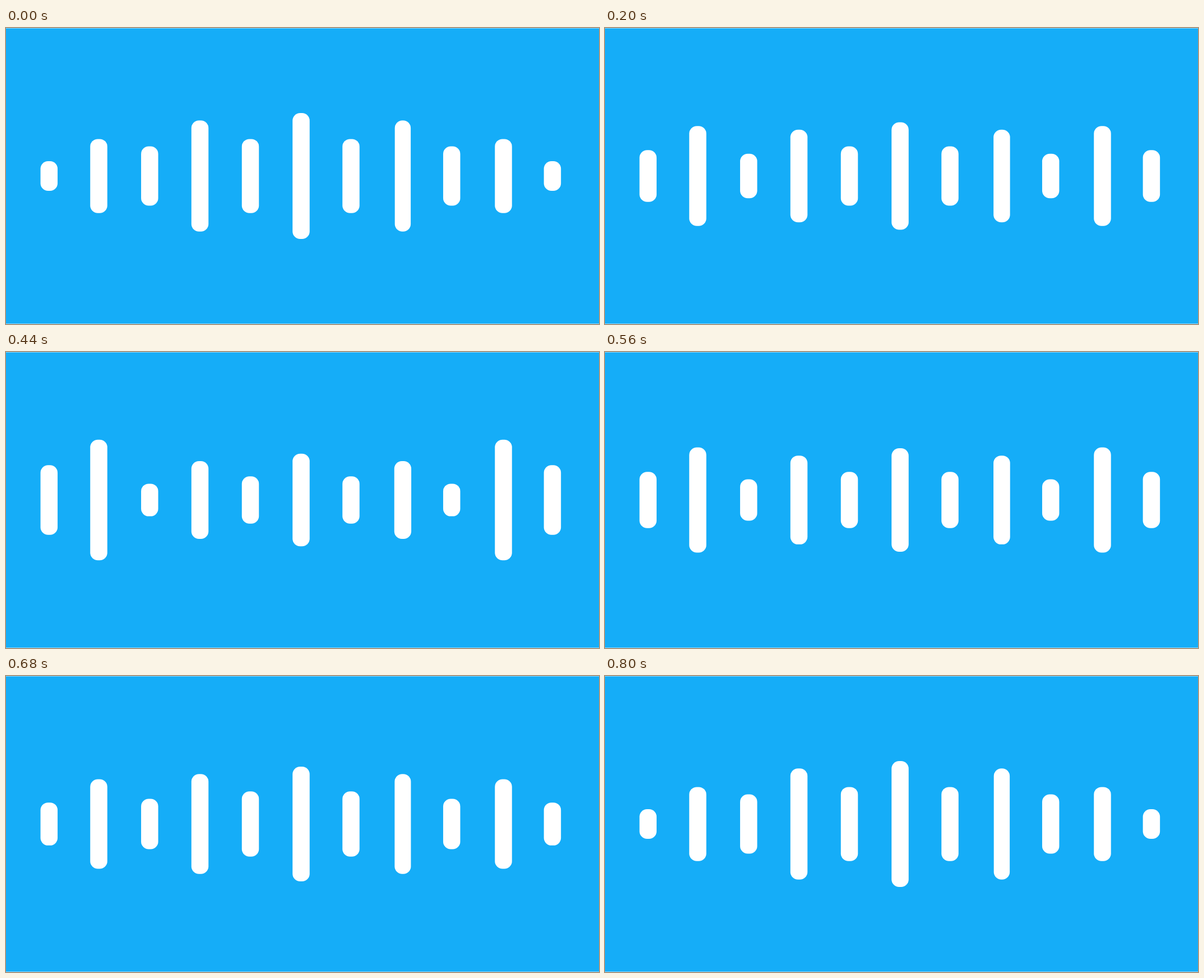
Recreate the animation shown at these times as an HTML page. Size 1058 by 529 pixels, loop 1000 ms.

```html
<!DOCTYPE html>
<html lang="en">
<head>
<meta charset="utf-8">
<title>Sound wave</title>
<style>
  html, body { margin: 0; width: 100%; height: 100%; overflow: hidden; background: #fff; }
  svg { display: block; width: 100%; height: 100%; }
</style>
</head>
<body>
<svg viewBox="0 0 1058 529">
  <rect y=".5" width="1058" height="528" fill="#15adf8"/>
  <g id="bars" fill="#fff"></g>
</svg>
<script>
  const UNIT = 529 / 80, MID = 264.5, WIDTH = 30.5, RADIUS = 13.5;
  const LOOP = 1000, SWING = 400, STEP = 40;

  // Each bar: centre x, half height at rest and at the peak (in units), width at rest
  const bars = [
    [76.8, 4, 10], [165.5, 10, 17], [256.3, 8, 4], [346, 15, 10],
    [436, 10, 6], [526.5, 17, 12], [615.5, 10, 6], [707.9, 15, 10, 28.4],
    [795.2, 8, 4], [887.5, 10, 17], [974.9, 4, 10]
  ].map(([x, rest, peak, thin = WIDTH]) => {
    const el = document.createElementNS("http://www.w3.org/2000/svg", "rect");
    el.setAttribute("rx", RADIUS);
    document.getElementById("bars").append(el);
    return { el, x, rest, peak, thin };
  });

  const mix = (a, b, k) => a + (b - a) * k;

  function draw(now) {
    const t = Math.floor((now % LOOP) / STEP) * STEP;
    const k = Math.max(0, 1 - Math.abs(t - SWING) / SWING);
    for (const { el, x, rest, peak, thin } of bars) {
      const half = mix(rest, peak, k) * UNIT;
      const width = mix(thin, WIDTH, k);
      el.setAttribute("x", x - width / 2);
      el.setAttribute("y", MID - half);
      el.setAttribute("width", width);
      el.setAttribute("height", half * 2);
    }
  }

  const start = performance.now();
  function tick() {
    draw(performance.now() - start);
    requestAnimationFrame(tick);
  }
  tick();
</script>
</body>
</html>
```
